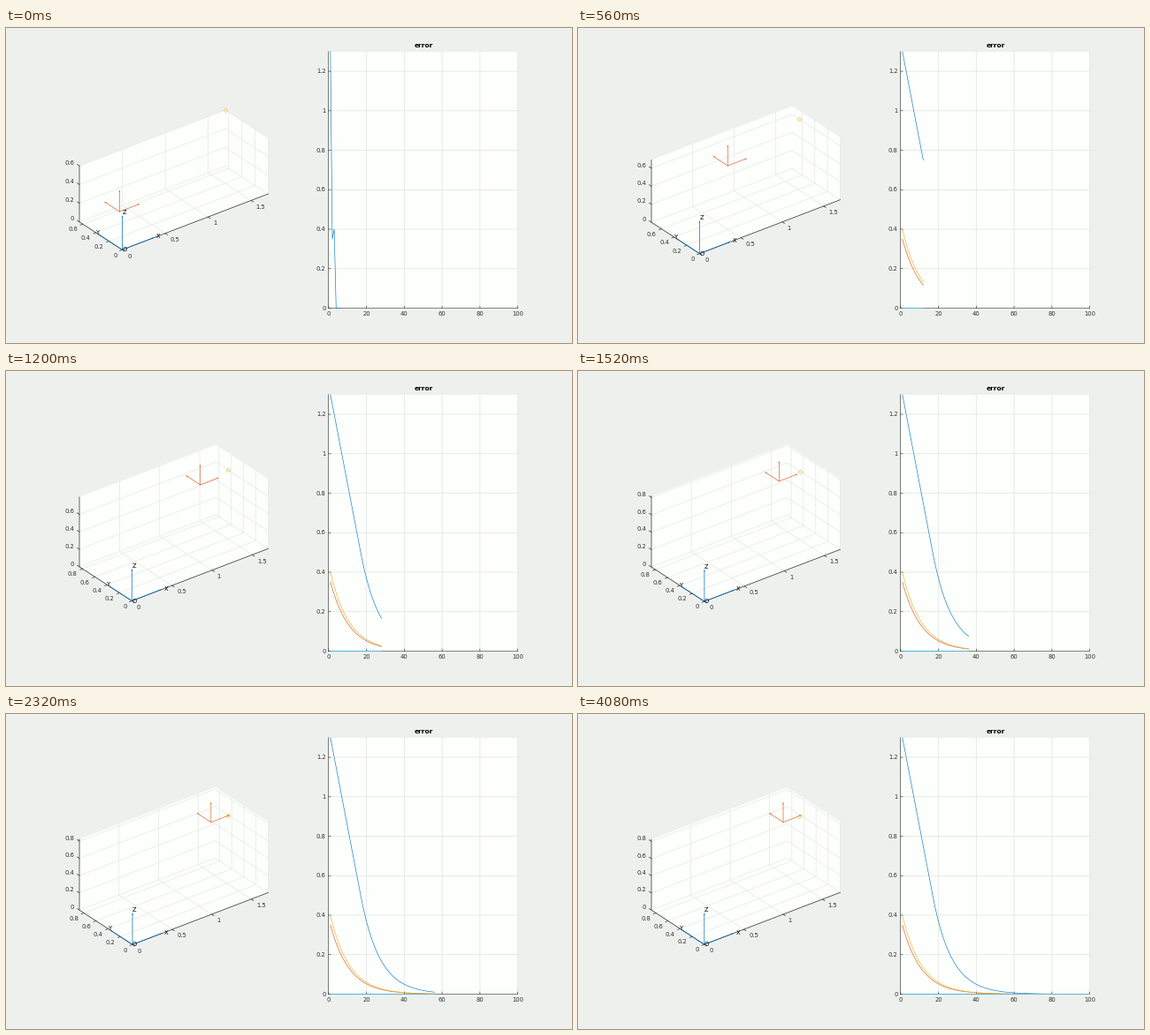
Recreate the animation shown at these times as a matplotlib script. Size 640 by 357 pixels, loop 4160 ms.

```python
import numpy as np
import matplotlib.pyplot as plt
from matplotlib.animation import FuncAnimation

W, H, DPI = 640, 357, 64
PX = 72 / DPI  # points per pixel
FRAMES, INTERVAL = 52, 80

BLUE, RED, GOLD, CYAN = "#0072bd", "#d95319", "#edb120", "#4dbeee"
PAPER, WALL, INK = "#eef0ee", "#fcfffc", "#303230"

# Orthographic view: azimuth -37.5, elevation 30 (screen y points down)
AZ, EL = np.radians(37.5), np.radians(30)
VIEW = np.array([
    [np.cos(AZ), -np.sin(EL) * np.sin(AZ)],
    [-np.sin(AZ), -np.sin(EL) * np.cos(AZ)],
    [0, -np.cos(EL)],
])
LEFT, RIGHT, MIDDLE = 83, 296.5, 172.1

GOAL = np.array([1.5, 0.65, 0.6])
MARK = np.array([1.7, 0.65, 0.6])
ARM, BASE_ARM, BASE_LABEL = 0.225, 0.36, 0.4

plt.rcParams["font.family"] = "DejaVu Sans"
fig = plt.figure(figsize=(W / DPI, H / DPI), dpi=DPI, facecolor=PAPER)
ax = fig.add_axes([0, 0, 1, 1])
ax.set_xlim(0, W)
ax.set_ylim(H, 0)
ax.axis("off")
live = []


def line(pts, color, width=0.7, z=3, **kw):
    x, y = np.transpose(pts)
    art, = ax.plot(x, y, color=color, lw=width * PX, zorder=z, snap=False, **kw)
    live.append(art)


def label(x, y, s, ha="center", size=6.7, color=INK, **kw):
    live.append(ax.text(x, y, s, ha=ha, va="center", fontsize=size * PX,
                        color=color, zorder=6, **kw))


def fill(pts):
    live.extend(ax.fill(*np.transpose(pts), color=WALL, lw=0, zorder=0))


def errors(k):
    """Tracking error per axis; x is speed limited until it reaches 0.5."""
    k = np.asarray(k, float)
    ex = np.where(k < 17, 1.3 - 0.05 * (k - 1), 0.5 * np.exp(-0.1 * (k - 17)))
    decay = np.exp(-0.1 * (k - 1))
    return np.array([ex, 0.35 * decay, 0.4 * decay])


def chart(k, e):
    return np.column_stack([364.7 + 2.14 * np.asarray(k),
                            317.5 - 223.7 * np.asarray(e)])


def chart_frame():
    fill(chart([0, 100, 100, 0], [0, 0, 1.3, 1.3]))
    for k in range(0, 101, 20):
        if k:
            line(chart([k, k], [0, 1.3]), "#dfe2df", z=1)
        x, y = chart([k], [0])[0]
        line([(x, y), (x, y - 2.5)], INK, 0.6)
        label(x, 324.5, str(k))
    for e in np.arange(7) / 5:
        if e:
            line(chart([0, 100], [e, e]), "#dfe2df", z=1)
        x, y = chart([0], [e])[0]
        line([(x, y), (x + 2.5, y)], INK, 0.6)
        label(361.6, y, f"{e:g}", "right")
    line(chart([0, 0, 100], [1.3, 0, 0]), INK, 0.6)
    label(472.3, 20.5, "error", size=7.4, weight="bold", color="black")


def curves(k):
    if k == 1:
        line(chart(np.arange(1, 7), [*errors(1), 0, 0, 0]), BLUE, 0.6, 4)
        return
    steps = np.arange(1, k + 1)
    for e, color in zip(errors(steps), (BLUE, RED, GOLD)):
        line(chart(steps, e), color, 0.6, 4)
    line(chart([1, k], [0, 0]), CYAN, 0.8, 5)


def projector(top):
    span = top[0] * np.cos(AZ) + top[1] * np.sin(AZ)
    scale = (RIGHT - LEFT) / span
    height = -scale * top @ VIEW[:, 1]
    origin = np.array([LEFT + scale * top[1] * np.sin(AZ), MIDDLE + height / 2])
    return lambda *p: origin + scale * np.array(p, float) @ VIEW


def room(proj, top):
    X, Y, Z = top
    fill([proj(0, 0, 0), proj(X, 0, 0), proj(X, 0, Z),
          proj(X, Y, Z), proj(0, Y, Z), proj(0, Y, 0)])

    def grid(*pts):
        line([proj(*p) for p in pts], "#e5e8e5", 0.7, 1)

    def tick(p, axis, sign, ha, dx, dy):
        a = proj(*p)
        d = sign * VIEW[axis] / np.hypot(*VIEW[axis])
        line([a, a + 3 * d], INK)
        label(a[0] + dx, a[1] + dy, f"{max(p) if axis else p[1]:g}", ha)

    def ticks(limit, step):
        return np.arange(int(limit / step + 1e-6) + 1) * step

    for v in ticks(X, 0.5):
        grid((v, 0, 0), (v, Y, 0), (v, Y, Z))
        tick((v, 0, 0), 1, -1, "left", 5.7, 7.2)
    for v in ticks(Y, 0.2):
        grid((0, v, 0), (X, v, 0), (X, v, Z))
        tick((0, v, 0), 0, -1, "right", -5.8, 6.2)
    for v in ticks(Z, 0.2):
        grid((0, Y, v), (X, Y, v), (X, 0, v))
        a = proj(0, Y, v)
        line([a, a + 3 * VIEW[1] / np.hypot(*VIEW[1])], INK)
        label(a[0] - 5.8, a[1] - 3.3, f"{v:g}", "right")
    line([proj(X, 0, 0), proj(0, 0, 0), proj(0, Y, 0), proj(0, Y, Z)], INK)


def triad(proj, at, size, color, width):
    start = proj(*at)
    for axis in np.eye(3):
        tip = proj(*(at + size * axis))
        d = (tip - start) / np.hypot(*(tip - start))
        n = 0.5 * np.array([-d[1], d[0]])
        line([start, tip], color, width, 4)
        line([tip - 1.5 * d + n, tip, tip - 1.5 * d - n], color, 0.4, 4)


def draw(i):
    while live:
        live.pop().remove()
    k = max(1, 2 * i - 2)
    pos = GOAL - errors(k)
    top = np.maximum(MARK, pos + ARM)
    proj = projector(top)

    chart_frame()
    curves(k)
    room(proj, top)
    triad(proj, np.zeros(3), BASE_ARM, BLUE, 0.7)
    triad(proj, pos, ARM, RED, 0.6)
    line([proj(*MARK)], GOLD, z=5, marker="o", ms=3.6 * PX, mfc="none",
         mew=0.6 * PX)
    for name, p in zip("OXYZ", np.vstack([np.zeros(3), BASE_LABEL * np.eye(3)])):
        x, y = proj(*p)
        label(x, y, name, "left", color="black")
    return live


anim = FuncAnimation(fig, draw, frames=FRAMES, interval=INTERVAL,
                     init_func=lambda: draw(0), repeat=True, repeat_delay=0,
                     blit=False)
plt.show()
```
